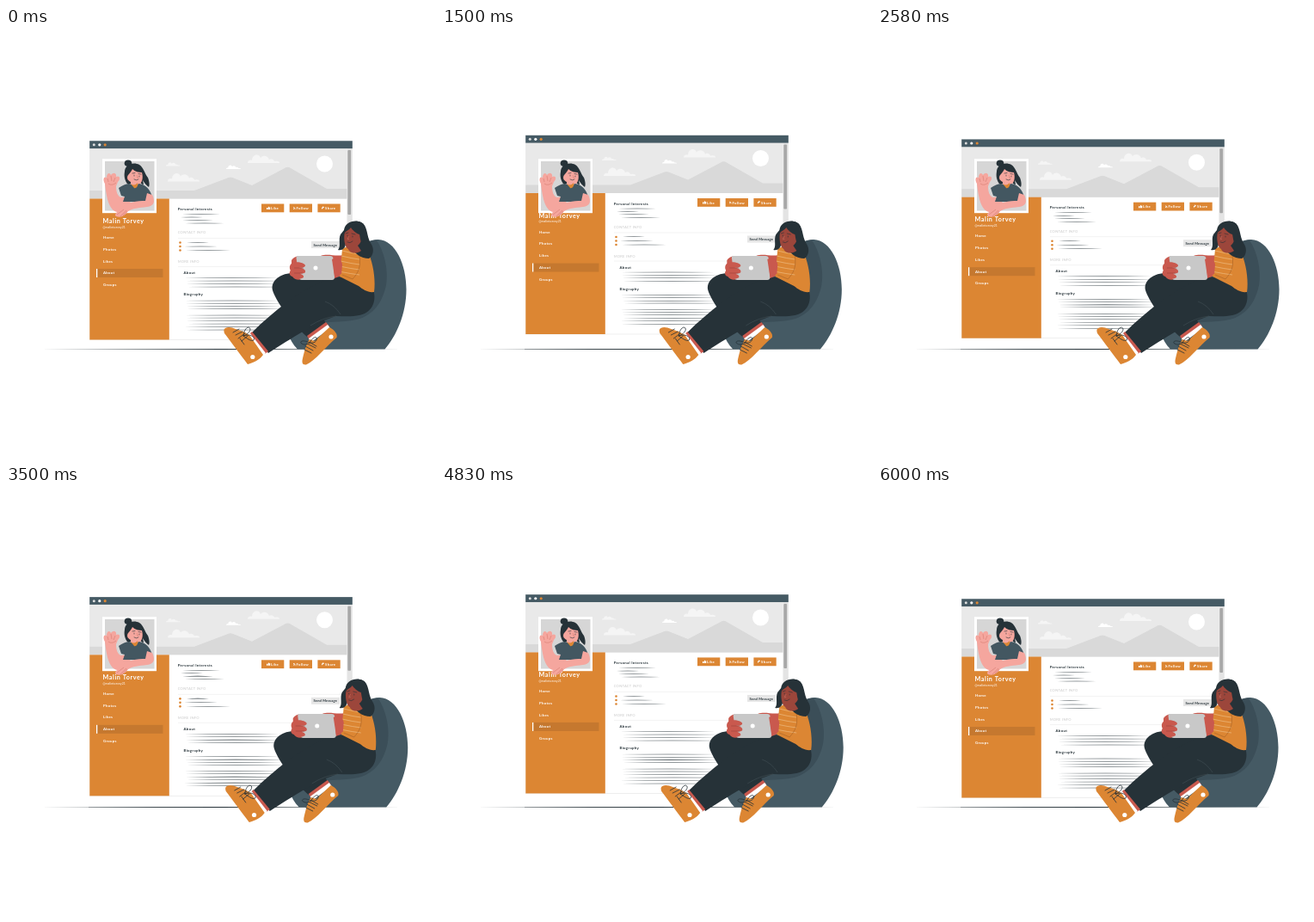
These frames come from a looping animation (500 px wide and 500 px high, 6.04 s). An HTML page:

```html
<!DOCTYPE html>
<html lang="en">
<head>
<meta charset="utf-8">
<title>Profile page</title>
<style>
  html, body { margin: 0; width: 100%; height: 100%; overflow: hidden; background: #fff; }
  svg { display: block; width: 100%; height: 100%; }
  text { font-family: Lato, "Open Sans", sans-serif; font-weight: 700; }
  .orange { fill: #dc8633; }
  .slate { fill: #455a64; }
  .dark { fill: #263238; }
  .white { fill: #fff; }
  .skin { fill: #c9594e; }
  .pink { fill: #f5a69e; }
  .ink { fill: none; stroke: #263238; stroke-linecap: round; stroke-linejoin: round; }
  .crease { fill: none; stroke: #cf7469; stroke-width: .5; }
  .menu { fill: #fff; font-size: 4.3px; letter-spacing: .32px; }
  .head { fill: #263238; font-size: 4.4px; letter-spacing: .3px; }
  .faint { fill: #c8c8c8; font-size: 4.1px; font-weight: 400; letter-spacing: .25px; }
</style>
</head>
<body>
<svg viewBox="0 0 500 500">
  <defs>
    <clipPath id="shirt">
      <path d="M391 257C399 251 413 252 420 258C427 273 430 292 428 307C421 308 415 304 410 300L388 289Z"/>
    </clipPath>
  </defs>

  <path class="dark" d="M41 373.500Q250 372.700 460 373.500Q250 374.300 41 373.500Z"/>

  <g id="window">
    <rect x="97.300" y="131.500" width="305.200" height="231" fill="#fff" stroke="#dedede" stroke-width=".5"/>
    <rect x="97.300" y="140" width="299.200" height="58.500" fill="#e9e9e9"/>
    <path d="M97.300 189H219L256 175Q261 172 266 175L286 183L324 163Q327.500 160.500 331 163L373 187H396.500V198.500H97.300Z" fill="#d9d9d9"/>
    <circle cx="370.500" cy="158" r="9.500" class="white"/>
    <g id="clouds"></g>
    <rect x="396.500" y="140" width="6" height="222" fill="#e4e4e4"/>
    <rect x="397.300" y="142" width="3.800" height="75" rx="1" fill="#a8a8a8"/>
    <rect x="97.200" y="131.300" width="305.600" height="8.800" class="slate"/>
    <circle cx="102.300" cy="135.800" r="1.500" fill="#ddd"/>
    <circle cx="108.800" cy="135.800" r="1.600" class="white"/>
    <circle cx="115.200" cy="135.800" r="1.600" class="orange"/>
    <rect x="97.300" y="198.500" width="92.500" height="164" class="orange"/>
    <rect x="105.500" y="280" width="77" height="10" fill="#c5782f"/>
    <rect x="105" y="280" width="1.300" height="10" class="white"/>
    <text x="112.500" y="227" font-size="7.200" letter-spacing=".6" class="white">Malin Torvey</text>
    <text x="112.500" y="232.700" font-size="3.500" letter-spacing=".1" class="white" style="font-weight:400">@malintorvey21</text>
    <g id="content"></g>
    <rect x="355" y="248" width="33" height="8" fill="#e6e6e6"/>
    <text x="357.500" y="253.600" font-size="4" letter-spacing=".18" class="dark">Send Message</text>
  </g>

  <g id="avatar">
    <rect x="112" y="152.200" width="63" height="63" class="white"/>
    <rect x="115" y="155" width="57.500" height="57.500" fill="#d6d6d6"/>
    <ellipse class="dark" cx="142" cy="157.300" rx="4.300" ry="3.800"/>
    <path class="dark" d="M138 167C138 159 148 155 155 159C160 162 161 169 165 174C167 179 167 183 166 185C163 183 161 180 159 177L160 182C158 182 156 180 155 178L142 182C138 178 137 172 138 167Z"/>
    <path class="pink" d="M142 171C144 169 146 166 147 164C150 167 155 168 158 168C160 175 158 181 154 182L153 187C150 189 146 187 145 183L145 179C141 177 140 174 142 171Z"/>
    <path class="pink" d="M115 181C112 176 114 172 117 174C117 168 121 168 122 171C125 167 129 169 128 173C132 171 134 175 130 179L128 184C128 191 130 196 134 197L143 196L146 209L130 214C120 213 117 198 115 181Z"/>
    <path class="crease" d="M118 175L119 179M122 172L123 178M127 174L125 179M119 181Q123 184 128 180"/>
    <path fill="#435761" d="M131 186C138 181 144 180 147 183C150 186 153 184 154 181C163 182 167 187 171 198L164 202L136 202L138 196L134 195Z"/>
    <path class="orange" d="M145 181C147 183 151 183 153 180C154 184 151 187 149 186Z"/>
    <path class="pink" d="M164 192L170 194C174 202 172 207 164 208C154 209 147 210 142 213C138 219 133 221 128 219C125 217 130 213 134 209C141 202 153 201 162 201Z"/>
    <path class="crease" d="M129 217L137 211M133 219L140 212M136 218L141 213"/>
    <path class="ink" stroke-width=".6" d="M147 169L150 168.500M154 169.500L157 170M149 171V172M155 172V173M149 176Q152 178 154 176"/>
    <path class="crease" d="M152 171L153.500 174H152"/>
  </g>

  <g id="reader">
    <path class="slate" d="M339 373.500C328 362 325 350 332 338L412 258C418 249 425 245.500 433 246C453 247 465.500 275 465.500 304C465.500 332 454 358 440.500 373.500Z"/>
    <path fill="#3b4e58" d="M413 256C419 249 426 246 431 247C440 260 445 282 442 299C438 318 428 334 408 339C390 343 371 340 356 346Z"/>
    <path class="dark" d="M341 285C321 283 307 293 310 305C313 316 331 342 350 359L373 344L353 318L390 292Z"/>
    <path class="dark" d="M286 354C299 341 312 330 325 320C341 308 360 297 375 291C394 287 412 292 426 302C432 315 427 331 411 334C402 336 392 335 384 335C360 342 332 361 305 378Z"/>
    <path fill="none" stroke="#46545b" stroke-width=".5" d="M384 335Q368 337 354 346M371 318Q382 322 389 333"/>

    <path class="skin" d="M286 353L305 376L301 379L283 356Z"/>
    <path class="white" d="M284 355L302 378L298 382L280 358Z"/>
    <path class="orange" d="M255 349C261 346 268 351 276 353L283 357L299 380C295 386 288 389 281 391C272 379 260 363 254 355C253 352 253 350 255 349Z"/>
    <circle cx="286.800" cy="382.500" r="2.600" class="white"/>
    <path class="ink" stroke-width=".8" d="M264 354L271 350M267 357L275 353M270 361L278 355M274 364L281 358M276 358C277 348 283 346 284 350C284 354 279 357 276 358C285 355 290 360 288 363C285 365 279 360 276 358M272 361L277 368"/>

    <path class="skin" d="M350 358L372 342L376 347L353 363Z"/>
    <path class="white" d="M352 361L374 345L377 349L354 366Z"/>
    <path class="orange" d="M376 348C382 351 386 356 384.500 360C372 370 360 387 349 391.500C344 392 344 388 345 384C347 376 349 367 353 362L359 364Z"/>
    <circle cx="378" cy="359" r="2.600" class="white"/>
    <path class="ink" stroke-width=".8" d="M347 374L355 378M348 370L357 375M350 367L360 372M353 366C343 361 341 366 344 367C347 369 351 368 353 366C358 357 363 359 361 363C359 367 355 366 353 366M354 366L361 370"/>

    <path class="skin" d="M366 265C374 262 383 266 392 264L395 286L382 291L367 285Z"/>
    <g clip-path="url(#shirt)">
      <rect x="384" y="248" width="50" height="64" class="orange"/>
      <g id="stripes" fill="none" stroke="#f0c48f" stroke-width=".6"></g>
    </g>
    <path fill="none" stroke="#9d5b22" stroke-width=".5" d="M411 265C413 279 409 285 403 292L391 287"/>

    <path class="dark" d="M393 235C394 226 405 222 413 226C421 230 419 242 424 250C429 257 427 265 422 268C413 268 404 262 401 253L395 250C395 256 391 259 386 258C390 254 386 246 389 240Z"/>
    <path fill="#9c463b" d="M394 237C398 230 409 230 413 238C415 244 413 250 409 253L413 259C406 264 399 261 398 257C394 255 392 245 394 237Z"/>
    <path class="dark" d="M393 239C394 228 405 222 413 226C420 229 419 243 415 250C412 250 412 244 411 240C407 239 403 235 401 232C399 235 395 236 393 239Z"/>
    <path class="ink" stroke-width=".6" d="M395 239L398 238M402 239L406 240M397 241V242M403 242V243M397 249Q400 251 403 248"/>
    <path class="crease" d="M399 242L397 245.500H399"/>

    <path class="skin" d="M332 270C335 265 342 264 348 267L350 288C345 294 336 294 333 289C329 288 329 284 331 282C329 279 330 275 332 274Z"/>
    <path fill="#c8c8c8" d="M339 265H377Q380 265 380.500 268L382 290Q382 293 379 293H344Q341 293 340.500 290L337.500 267Q337.500 265 339 265Z"/>
    <path class="skin" d="M333 273C339 271 347 273 348 276C348 279 342 279 336 279C343 278 349 280 348 284C347 286 341 286 336 285C342 285 347 287 346 290C342 293 335 292 333 288C330 286 330 278 333 273Z"/>
    <path fill="none" stroke="#8e3d35" stroke-width=".5" d="M335 279H346M335 285H345"/>
    <path class="skin" d="M379 269C384 266 390 269 391 275L390 286L382 289Z"/>
    <circle cx="360" cy="279" r="2.500" class="white"/>
  </g>
</svg>

<script>
const byId = id => document.getElementById(id);
const add = (id, items, draw) => { byId(id).innerHTML += items.map(draw).join(''); };
const label = cls => ([str, x, y]) => `<text class="${cls}" x="${x}" y="${y}">${str}</text>`;

// A line of dummy text: a sliver that thins out towards both ends.
const sliver = ([x1, x2, y]) => {
  const mid = (x1 + x2) / 2;
  return `<path class="dark" d="M${x1} ${y}Q${mid} ${y - .55} ${x2} ${y}Q${mid} ${y + .55} ${x1} ${y}Z"/>`;
};

add('clouds', [[186, 160.5, .45, '#f5f5f5'], [188, 178.5, 1, '#f5f5f5'], [256, 164, .46, '#fff'], [281, 157, 1, '#f5f5f5']],
  ([x, y, s, fill]) => `<path transform="translate(${x} ${y}) scale(${s})" fill="${fill}"
    d="M0 0C0-3 3-4 5-3C5-10 13-12 15-6C18-10 24-8 25-4C28-6 31-3 31-2Q37-3 37 0Z"/>`);

add('content', ['Home', 'Photos', 'Likes', 'About', 'Groups'],
  (name, i) => label('menu')([name, 113, 245 + i * 13.8]));

add('content', [['Personal Interests', 199.7, 212], ['About', 206.5, 286], ['Biography', 206.5, 311.5]], label('head'));
add('content', [['CONTACT INFO', 199.7, 239.5], ['MORE INFO', 199.7, 273]], label('faint'));
add('content', [244.5, 277.5], y => `<path d="M200 ${y}H396" stroke="#e6e6e6" stroke-width=".5"/>`);

add('content', [
  [205, 249, 216.5], [203, 229, 220], [205, 241, 223.3], [208, 254, 227],
  [210, 236, 249.3], [207, 246, 254], [209, 261, 258.5]
], sliver);
add('content', [290.5, 294, 297.3, 301, 317, 320.3, 323.7, 326.5, 334, 337, 340.3, 344, 347.3, 351],
  (y, i) => sliver([207 + i * 5 % 4, 318 + i * 7 % 13, y]));
add('content', [249.5, 254, 258.5], y => `<circle class="orange" cx="202.5" cy="${y}" r="1.3"/>`);

const icons = [
  'M303 209h1.2v2h-1.2zM304.6 209l1-1.5 .7 1h.9v2.5h-2.6z',
  'M334 208.2q2.5 0 2.5 2.6h-.8q0-1.8-1.7-1.8zM334 209.7q1 0 1 1h-1z',
  'M367 211v-2l1.5-1v-.9l1.5 1.4-1.5 1.4v-.9z'
];
add('content', [['Like', 297, 308], ['Follow', 329.7, 337.5], ['Share', 362.4, 371]], ([name, x, tx], i) =>
  `<rect class="orange" x="${x}" y="204.5" width="26.3" height="9.8"/>
   <path class="white" d="${icons[i]}"/>${label('menu')([name, tx, 211])}`);

add('stripes', [0, 1, 2, 3, 4], i =>
  `<path d="M${391 - i} ${259 + i * 6}Q402 ${262 + i * 6} 411 ${263 + i * 6}"/>`);

const LOOP = 6040, CYCLE = 6000, FLOAT = 3000, SCALE = .65;
const SHAKE = [0, -1, 2, -4, 4, -4, 4, -4, 2, -1, 0];

function shakeAt(t) {
  const pos = (t % CYCLE) / CYCLE * 10;
  const i = Math.floor(pos);
  return SHAKE[i] + (SHAKE[i + 1] - SHAKE[i]) * (pos - i);
}

function render(t) {
  const phase = t % FLOAT / FLOAT;
  const rise = 1 - Math.abs(1 - 2 * phase);
  byId('window').setAttribute('transform', `translate(0 ${-10 * SCALE * rise})`);
  byId('reader').setAttribute('transform', `translate(${SCALE * shakeAt(t)} 0)`);
}

const start = performance.now();
function tick() {
  render((performance.now() - start) % LOOP);
  requestAnimationFrame(tick);
}
tick();
</script>
</body>
</html>
```
